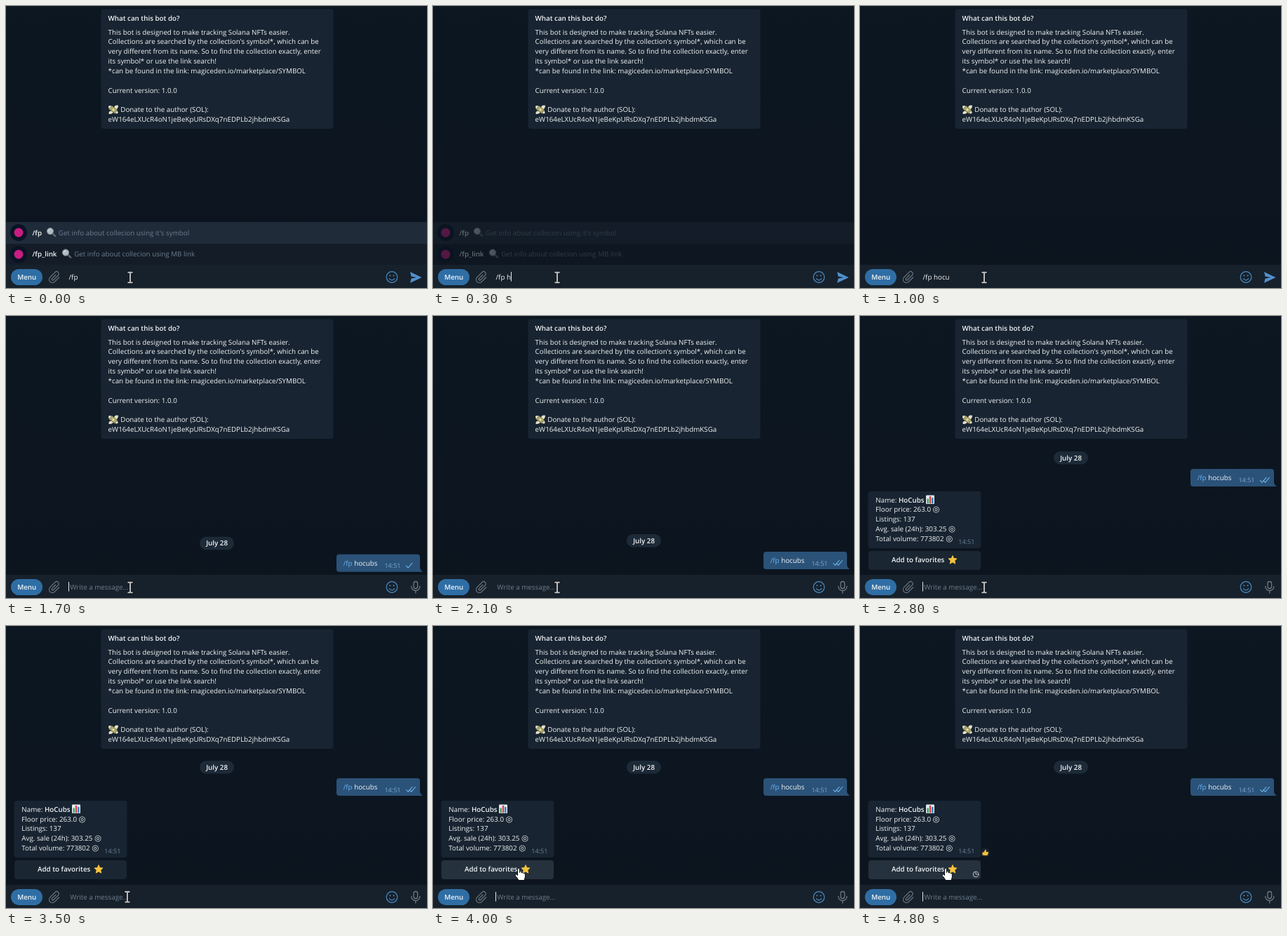
Write an HTML page that moves like this. It is 600 px wide and 402 px high and loops after 5000 ms.

```html
<!DOCTYPE html>
<html lang="en">
<head>
<meta charset="utf-8">
<title>Chat bot</title>
<style>
  html, body { margin: 0; width: 100%; height: 100%; overflow: hidden; background: #0d151f; }
  svg { display: block; }
  text { font: 9.8px "Open Sans", sans-serif; fill: #f1f4f6; white-space: pre; text-rendering: geometricPrecision; }
  .b { font-weight: 600; }
  .dim { fill: #6c7c8c; }
  .small { font-size: 9.05px; }
  .ring { font: 11.5px "DejaVu Sans", sans-serif; }
  .line { fill: none; stroke-linecap: round; stroke-linejoin: round; }
</style>
</head>
<body>
<svg width="600" height="402" viewBox="0 0 600 402">
  <defs>
    <linearGradient id="sky" x2="0" y2="1">
      <stop stop-color="#0c1722"/><stop offset="1" stop-color="#0c141e"/>
    </linearGradient>
    <clipPath id="buttonClip"><rect x="12" y="334" width="160" height="27" rx="4"/></clipPath>
    <g id="lens">
      <path class="line" d="M3 3L6.3 6" stroke="#5d6469" stroke-width="2.4"/>
      <circle cx="-1" cy="-1" r="4.6" fill="#aebcc4" stroke="#7b878e" stroke-width="1"/>
      <path class="line" d="M-3.6-1A2.8 2.8 0 0 1-1-3.6" stroke="#dce6ea"/>
    </g>
    <path id="check" class="line" d="M0 4l2.6 2.8L8.4 0" stroke="#70b6ec" stroke-width="1.1"/>
    <path id="bar" d="M-2.6-7.3H2.6M0-7.3V7.3M-2.6 7.3H2.6"/>
  </defs>

  <rect width="600" height="402" fill="url(#sky)"/>

  <!-- bot description -->
  <rect x="135.5" y="4.5" width="331" height="170.5" rx="4" fill="#182431"/>
  <text class="b" x="145.5" y="20.5">What can this bot do?</text>
  <g id="about"></g>
  <g transform="translate(153 147.8)">
    <path d="M-7-5Q-3-7.5-1-2L-3 1Q-7 0-7-5ZM1-3Q2-7.5 7-6Q7-1 3 0ZM-2 2Q-7 1-6.5 6Q-3 7 0 4ZM3 2Q7 1 6.5 5Q4 7 2 4Z" fill="#e6dfcb"/>
    <rect x="-5" y="-3" width="10" height="6" fill="#aaa56c" stroke="#6f7748" stroke-width=".7" transform="rotate(38)"/>
    <circle r="1.6" fill="#ece3a5"/>
  </g>

  <!-- command suggestions -->
  <g id="hints">
    <rect y="308" width="600" height="31" fill="#202b39"/>
    <rect y="339" width="600" height="30" fill="#131c27"/>
    <circle cx="18" cy="323" r="12" fill="#0a1324"/>
    <circle cx="18" cy="323" r="6.5" fill="#c81d82"/>
    <circle cx="18" cy="354" r="12" fill="#0a1324"/>
    <circle cx="18" cy="354" r="6.5" fill="#c81d82"/>
    <text class="b" x="37.5" y="326.5">/fp</text>
    <use href="#lens" x="64" y="322"/>
    <text class="dim" x="74.8" y="326.5">Get info about collecion using it's symbol</text>
    <text class="b" x="37.5" y="357.2">/fp_link</text>
    <use href="#lens" x="86" y="352.5"/>
    <text class="dim" x="97.2" y="357.2">Get info about collecion using MB link</text>
  </g>

  <!-- sent message -->
  <g id="sent">
    <rect x="276" y="311" width="49" height="18.5" rx="9.2" fill="#1d2a37"/>
    <text class="b" x="300.6" y="323.6" text-anchor="middle">July 28</text>
    <path d="M475 336H586Q590 336 590 340V356Q591 359 594 361H475Q471 361 471 357V340Q471 336 475 336Z" fill="#2b5278"/>
    <text x="480.7" y="352"><tspan fill="#6ab3f3">/fp</tspan> hocubs</text>
    <text class="small" x="539.4" y="355.5" style="fill:#7da8d3">14:51</text>
    <use href="#check" x="570.5" y="348.5"/>
    <use id="seen" href="#check" x="575" y="348.5"/>
  </g>

  <!-- bot reply -->
  <g id="reply">
    <rect x="11.5" y="249" width="161" height="81" rx="4" fill="#182431"/>
    <text x="22.3" y="264.7">Name: <tspan class="b">HoCubs</tspan></text>
    <g transform="translate(94 254.5)">
      <rect width="12" height="12.5" rx="1" fill="#e4eaee"/>
      <path d="M1.5 5h2.4v7H1.5z" fill="#3da35a"/>
      <path d="M4.8 1.5h2.4V12H4.8z" fill="#d8404a"/>
      <path d="M8.1 3.5h2.4V12H8.1z" fill="#2f7fc4"/>
    </g>
    <g id="stats"></g>
    <text class="small" x="140.3" y="324.3" style="fill:#6d8296">14:51</text>
    <g clip-path="url(#buttonClip)">
      <rect id="button" x="12" y="334" width="160" height="27"/>
      <circle id="ripple" cx="122" cy="347" fill="#fff"/>
    </g>
    <text class="b" x="45" y="350.3">Add to favorites</text>
    <path id="star" fill="#f8c33c" stroke="#f8c33c" stroke-linejoin="round"/>
    <g id="wait" class="line" stroke="#c6ced5" stroke-width="1">
      <circle cx="165" cy="354" r="3.8"/><path d="M165 351.8V354h1.8"/>
    </g>
    <g id="thumb">
      <circle cx="178.5" cy="323" r="6.8" fill="#18222d"/>
      <path d="M174.5 322.5H176.5L178.6 318.8Q180.4 318.8 179.6 322H182.6Q183.6 323 182.6 324.4L181.6 327H177L174.5 326.6Z" fill="#f6bd3a"/>
    </g>
  </g>

  <!-- input bar -->
  <rect y="369" width="600" height="33" fill="#17212b"/>
  <rect x="7" y="375" width="45" height="23" rx="11.5" fill="#2f6ea5"/>
  <text class="b" x="29.7" y="390.2" text-anchor="middle">Menu</text>
  <path class="line" transform="translate(69.3 386.7) rotate(45)" stroke="#6c7883" stroke-width="1.2"
    d="M4.6-4.5V4.5A4.6 4.6 0 0 1-4.6 4.5V-5.5A3.1 3.1 0 0 1 1.6-5.5V3.8A1.5 1.5 0 0 1-1.4 3.8V-3.5"/>
  <g class="line" stroke="#4a8bc4" stroke-width="1.2">
    <circle cx="550" cy="386.5" r="7.8"/>
    <path d="M546.2 388.6Q550 393 553.8 388.6"/>
    <path d="M547.4 384.3v.1M552.6 384.3v.1" stroke-width="1.9"/>
  </g>
  <path id="send" d="M576 379L592.5 386.9L576 394.8L577.5 388.4L585 386.9L577.5 385.4Z" fill="#5290cc"/>
  <g id="mic" class="line" stroke="#6c7883" stroke-width="1.3">
    <rect x="581" y="378.5" width="5.6" height="10" rx="2.8"/>
    <path d="M577.7 385.5a6.1 6 0 0 0 12.2 0M583.8 391.6V395"/>
  </g>
  <text id="hint" class="dim" x="91.3" y="390">Write a message...</text>
  <text id="input" x="89.5" y="389.6"></text>
  <rect id="caret" y="379" width="1" height="13.5" fill="#e6eaed"/>

  <!-- pointers -->
  <g id="beam" fill="none">
    <use href="#bar" stroke="#0c1117" stroke-width="4" stroke-linecap="square"/>
    <use href="#bar" stroke="#b9bdc0" stroke-width="2.1" stroke-linecap="square"/>
  </g>
  <path id="hand" d="M-1.5 1Q0-1 1.5 1V6.5Q3-.0 4.4 7Q6 5.5 7 7.6Q9 6.5 9.4 9V13Q8.8 15 8 17.5H0Q-1.5 14-4.8 11Q-5.5 8.8-3.4 9L-1.5 10.5Z"
    fill="#fff" stroke="#0a0d12" stroke-width="1"/>
</svg>
<script>
const $ = id => document.getElementById(id);
const show = (id, on) => $(id).setAttribute('opacity', +on);
const move = (id, x, y) => $(id).setAttribute('transform', `translate(${x} ${y})`);
const clamp = v => Math.max(0, Math.min(1, v));
const PITCH = 13.85, TOP = 40.6;

const lines = (x, y, rows) => rows.map((row, i) => `<text x="${x}" y="${y + i * PITCH}">${row}</text>`).join('');

$('about').innerHTML = lines(145.6, TOP, [
  'This bot is designed to make tracking Solana NFTs easier.',
  "Collections are searched by the collection's symbol*, which can be",
  'very different from its name. So to find the collection exactly, enter',
  'its symbol* or use the link search!',
  '*can be found in the link: magiceden.io/marketplace/SYMBOL',
  '',
  'Current version: 1.0.0'
]) + lines(163.3, TOP + 8 * PITCH, ['Donate to the author (SOL):'])
  + lines(145.6, TOP + 9 * PITCH, ['eW164eLXUcR4oN1jeBeKpURsDXq7nEDPLb2jhbdmKSGa']);

const ring = ' <tspan class="ring">◎</tspan>';
$('stats').innerHTML = lines(22.3, 264.7 + PITCH, [
  'Floor price: 263.0' + ring, 'Listings: 137', 'Avg. sale (24h): 303.25' + ring, 'Total volume: 773802' + ring
]);

$('star').setAttribute('d', 'M' + Array.from({ length: 10 }, (_, i) => {
  const r = i % 2 ? 2.9 : 6.3, a = i * Math.PI / 5;
  return `${132 + r * Math.sin(a)} ${347 - r * Math.cos(a)}`;
}).join('L') + 'Z');

const keys = [[' ', 100], ['h', 300], ['o', 500], ['c', 800], ['u', 1000], ['b', 1200], ['s', 1300]];
const SENT = 1600, REPLY = 2600, CLICK = 4200;
// share of a scroll still to go; the first step lands well into it
const left = (t, from) => (1 - clamp((t - from + 200) / 500)) ** 3;

function draw(t) {
  const sent = t >= SENT, reply = t >= REPLY;
  show('hints', clamp(1 - t / 480));

  $('input').textContent = sent ? '' : '/fp' + keys.filter(k => t >= k[1]).map(k => k[0]).join('');
  show('hint', sent);
  show('send', !sent);
  show('mic', sent);
  const blink = sent ? Math.floor((t - 1540) / 530) % 2 === 0 : t >= 100 && (t < 1000 || t >= 1200);
  show('caret', blink);
  $('caret').setAttribute('x', sent ? 89 : 89.5 + $('input').getComputedTextLength());

  const rest = 119 * left(t, REPLY);
  show('sent', sent);
  move('sent', 0, reply ? rest - 119 : 58 * left(t, SENT));
  show('seen', t >= 1900);
  show('reply', reply);
  move('reply', 0, rest);

  const p = clamp((t - 3400) / 600), s = p * p * (3 - 2 * p);
  const x = 177 - 55 * s, y = 387 - 42 * s ** 1.5;
  const beam = y > 369;
  show('beam', beam);
  show('hand', !beam);
  move('beam', x, y);
  move('hand', x, y);

  const over = y < 361, q = clamp((t - CLICK) / 400);
  $('button').setAttribute('fill', over ? '#25313d' : '#1a2632');
  $('ripple').setAttribute('r', 130 * q);
  show('ripple', 0.08 * (1 - q));
  show('wait', t >= CLICK);
  show('thumb', clamp((t - CLICK) / 300));
}

function tick(now) {
  draw(Math.floor(now % 5000 / 100) * 100);
  requestAnimationFrame(tick);
}
draw(0);
requestAnimationFrame(tick);
</script>
</body>
</html>
```
